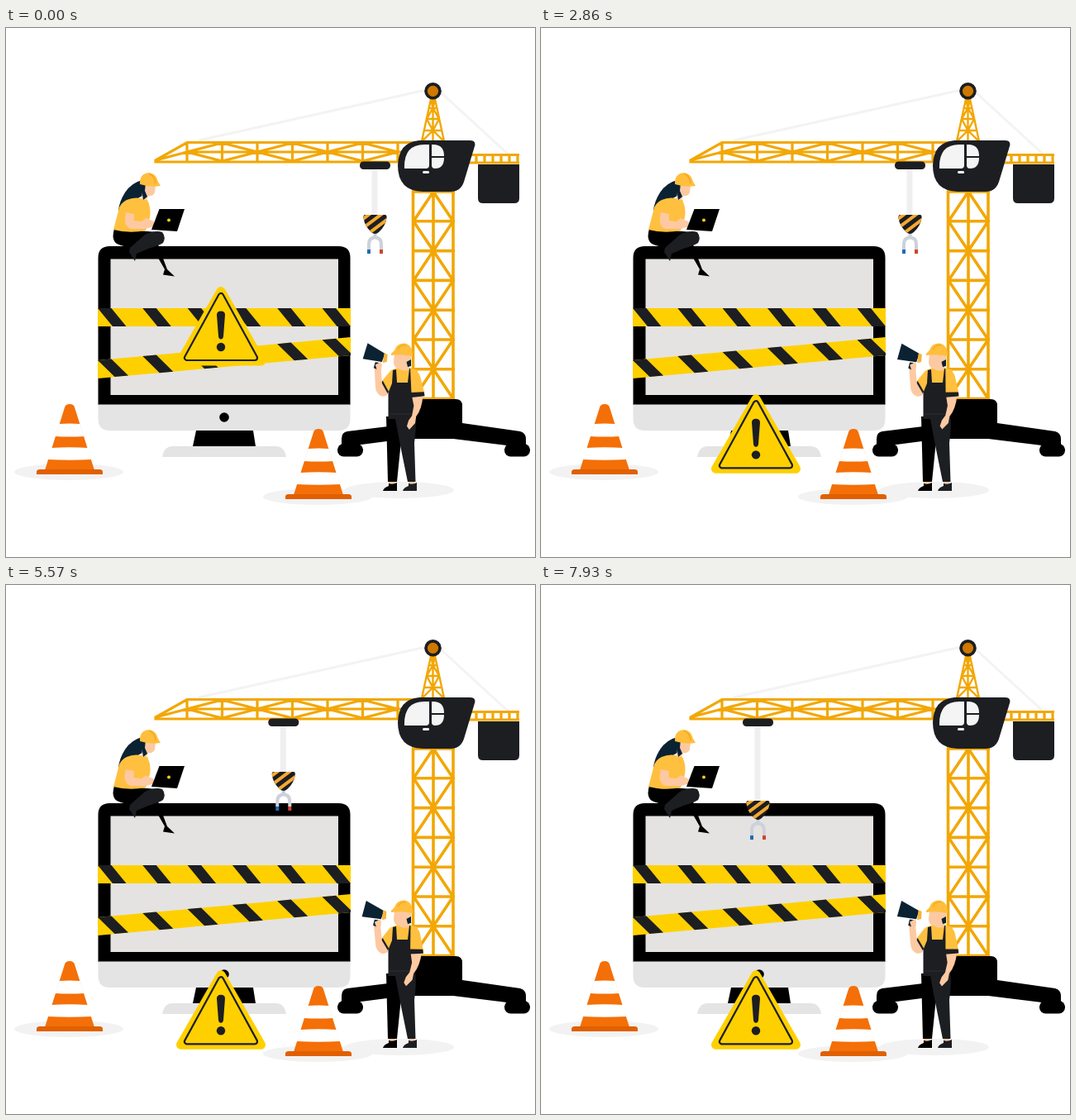
Recreate the animation shown at these times as an HTML page. Size 640 px wide and 640 px high, loop 8 s.

```html
<!DOCTYPE html>
<html lang="en">
<head>
<meta charset="utf-8">
<title>Under construction</title>
<style>
  html, body { margin: 0; width: 100%; height: 100%; overflow: hidden; background: #fff; }
  svg { display: block; width: 100vw; height: 100vh; }
  .ink { fill: #1c1e22; }
  .skin { fill: #fdc9a2; }
  .shirt { fill: #ffc03f; }
  .navy { fill: #0b2233; }
  .tape { fill: #ffd000; }
  .truss { fill: none; stroke: #f2a705; stroke-width: 3.2; }
  #tower { stroke-width: 3.6; }
  #peak { stroke-width: 2.4; }
</style>
</head>
<body>
<svg viewBox="0 0 640 640">
  <defs>
    <g id="cone">
      <ellipse cx="76" cy="537" rx="66" ry="10" fill="#f2f2f2"/>
      <path d="M71 459Q72 455 77 455Q82 455 83 459L107 535H47Z" fill="#f46f07"/>
      <path d="M64.500 479Q77 478 89.500 479L94.500 494Q77 495 59.500 494ZM55 508Q77 506.500 99 508L103.500 522Q77 523.500 50.500 522Z" fill="#fff"/>
      <path d="M37 540V537Q37 534 41 534H113Q117 534 117 537V540Z" fill="#e06000"/>
    </g>
    <clipPath id="block"><path d="M434 226H459Q461 226 460.500 230Q459 240 451 247Q446.500 251 442 247Q434 240 432.500 230Q432 226 434 226Z"/></clipPath>
    <clipPath id="screenWidth"><path d="M111 330H417V430H111Z"/></clipPath>
  </defs>

  <!-- Crane -->
  <path d="M233 136L508 75M525 77L610 155" fill="none" stroke="#f3f3f3" stroke-width="3"/>
  <path id="jib" class="truss"/>
  <path id="tower" class="truss"/>
  <path id="peak" class="truss"/>
  <path id="counterJib" class="truss"/>
  <circle cx="516.500" cy="76.300" r="10.300" class="ink"/>
  <circle cx="516.500" cy="76.300" r="6.600" fill="#cf7800"/>
  <path class="ink" d="M571 165H621V206Q621 212 615 212H577Q571 212 571 206Z"/>
  <path class="ink" d="M500 136H561Q569 136 567 143L554 186Q550 198 538 198H504Q474 197 474 166Q475 138 500 136Z"/>
  <path fill="#f4f4f4" d="M482 170Q481 141 506 141H512V166Q512 170 508 170ZM515 141H517Q530 141 530 155H515ZM515 157H530Q530 170 519 170Q515 170 515 166ZM505 173H511Q512 173 512 174.500T511 176H505Q504 175.500 504 174.500T505 173Z"/>
  <path d="M479 480V457Q479 449 487 449H544Q552 449 552 457V478L622 488Q629 490 629 497V505H606L541 497H484L422 505H406V497Q406 489 413 488Z"/>
  <rect x="401" y="503" width="31" height="15.500" rx="7.500"/>
  <rect x="603" y="503" width="31" height="15.500" rx="7.500"/>

  <!-- Monitor -->
  <path d="M230 487H299L302 506H226Z"/>
  <path d="M189 519Q191 506 202 506H326Q337 506 339 519Z" fill="#e4e4e4"/>
  <path d="M111.500 456V278Q111.500 264 125.500 264H402.500Q416.500 264 416.500 278V456Z"/>
  <path d="M111.500 455.500H416.500V473Q416.500 487 402.500 487H125.500Q111.500 487 111.500 473Z" fill="#e4e4e4"/>
  <rect x="126.500" y="279.500" width="275.500" height="164.500" fill="#e4e3e2"/>
  <circle cx="264" cy="471" r="5.800"/>
  <g clip-path="url(#screenWidth)">
    <path class="tape" d="M111 339H417V361H111Z"/>
    <path id="upperStripes" class="ink"/>
    <path class="tape" d="M111 402L417 374V396L111 424Z"/>
    <path id="lowerStripes" class="ink"/>
  </g>

  <!-- Seated worker -->
  <path class="navy" d="M165 184Q152 187 144 199Q137 210 136 221Q147 213 154 207Q167 206 171 194Z"/>
  <path d="M184 262L189 276L195 292L204 300.500L190 298.500L192 292L184 278L178 262Z"/>
  <path d="M131 243Q127 256 134 261Q146 267 164 264L181 261L184 247Z"/>
  <path class="ink" d="M150 266L168 250Q181 244 189 247Q194 253 190 260Q186 263 172 267L158 273L156 282L149 271Z"/>
  <path class="shirt" d="M146 208Q157 203 171 208Q176 218 174 229L169 245Q149 249 130 244Q133 233 137 217Q140 211 146 208Z"/>
  <path class="skin" d="M166 188L181 190L180 199Q178 204 172 203L170 208H164Z"/>
  <path class="navy" d="M163 187H169L168 197L171 204L166 208Z"/>
  <path fill="#ffbe3c" d="M162 189Q161 178 170 175.500Q181 174 184 186L187 191Q175 193 162 189Z"/>
  <path d="M173 176Q180 179 181 188" fill="none" stroke="#f2a91f" stroke-width="1.500"/>
  <g id="typingArm">
    <path class="shirt" d="M145 211Q152 210 157 219L156 226L143 224Z"/>
    <path class="skin" d="M145 223L155 225L155 233L164 234L169 230L179 234V240L169 243L151 243Q143 240 144 230Z"/>
  </g>
  <path d="M185.500 219H216L207 246L176 244Z"/>
  <circle cx="197" cy="232.500" r="2" fill="#f5cf16"/>

  <!-- Trolley and hook -->
  <g id="trolley">
    <rect x="428" y="161.500" width="37" height="9.500" rx="4.500" class="ink"/>
    <rect id="rope" x="442.500" y="171" width="7" fill="#efefef"/>
    <g id="hook">
      <path d="M446.500 248V255" stroke="#c9ced6" stroke-width="4"/>
      <path d="M439 268V262Q439 253.500 446.500 253.500T454 262V268" fill="none" stroke="#cdd1da" stroke-width="4"/>
      <path d="M437 268H441V273H437Z" fill="#2369b4"/>
      <path d="M452 268H456V273H452Z" fill="#d0432c"/>
      <g clip-path="url(#block)">
        <path class="ink" d="M430 224H464V252H430Z"/>
        <path d="M428 234L444 222M428 245L460 221M432 253.500L468 226.500" stroke="#f5a92f" stroke-width="4"/>
      </g>
    </g>
  </g>

  <!-- Standing worker -->
  <ellipse cx="476" cy="559" rx="66" ry="10" fill="#f2f2f2"/>
  <use href="#cone"/>
  <use href="#cone" x="301" y="30"/>
  <path class="skin" d="M463 546H471V553H463ZM487 546H494V553H487Z"/>
  <path d="M460 470H481L473 549H462Z"/>
  <path class="ink" d="M470 468H495Q497 480 494 502L495.500 549H486L477 505Z"/>
  <path d="M463 551Q468 553 473 550V560H456Q457 556 463 554Z"/>
  <path class="ink" d="M487 551Q492 553 497 550V560H480Q481 556 487 554Z"/>
  <path class="shirt" d="M466 414L474 411H488L498 414V445H466Z"/>
  <g id="megaphoneArm">
    <path class="shirt" d="M466 414L454 428L460 442L470 433Z"/>
    <path class="ink" d="M453 429L456 427L463 440L460 444Z"/>
    <path class="skin" d="M446 413Q445 406 449 404L455 407L454 415L455 430L462 443Q459 447 453 445Q447 441 447 434Z"/>
    <path class="navy" d="M438 381L459 394L455 404L432 400Z"/>
    <path d="M458 393L462 395L461 404L456 405Z" fill="#f4b33c"/>
    <path d="M447 404L452 405L449 413L445 411Z" class="navy"/>
    <path class="skin" d="M447 407L454 404L455 409L449 414Z"/>
  </g>
  <path class="ink" d="M468 414L472 413L473 429H486L488 412L492 413L494 430L495 473H462.500V441L467 430Z"/>
  <path d="M463 467H494" stroke="#34363a" stroke-width=".7"/>
  <path class="skin" d="M470 394H490V404L487 414Q480 416 475 412Q469 411 469 404Z"/>
  <path class="navy" d="M484.500 404L490 401V409L486 410Z"/>
  <path fill="#ffbe3c" d="M466 394L470 390Q472 382 481 381.500Q492 382 492 397Q479 394 466 396Z"/>
  <path d="M474 389Q478 382 484 384" fill="none" stroke="#f2a91f" stroke-width="1.300"/>
  <g id="loweredArm">
    <path class="skin" d="M491 443H505Q504 461 497 470L496 478L489 486L486 482L488 475L492 469L494 457Z"/>
    <path class="shirt" d="M489 412Q498 413 501 421L507 443L491 444Z"/>
    <path class="ink" d="M490 441L506 440L507 445L491 447Z"/>
  </g>

  <!-- Warning sign -->
  <g id="sign" stroke-linejoin="round">
    <path d="M260 335.500L211.500 420H308.500Z" fill="#ffd000" stroke="#ffd000" stroke-width="11"/>
    <path d="M260 341L219 416H301Z" fill="#1c1e22" stroke="#1c1e22" stroke-width="8.200"/>
    <path d="M260 341L219 416H301Z" fill="#ffd000" stroke="#ffd000" stroke-width="3.800"/>
    <path class="ink" d="M255 364Q255 359.500 260 359.500T265 364L263 390Q262.500 393.500 260 393.500T257 390Z"/>
    <circle cx="260" cy="403" r="5.200" class="ink"/>
  </g>
</svg>
<script>
const LOOP = 8000;
const el = id => document.getElementById(id);
const line = (...p) => 'M' + p.join(' ');
const range = (n, f) => Array.from({ length: n }, (_, i) => f(i)).join('');

function drawTrusses() {
  el('jib').setAttribute('d',
    'M500 138.500H219L181 160V162H500M181 160L219 150H490' +
    range(7, i => line(219 + 42.5 * i, 138, 219 + 42.5 * i, 162)) +
    range(6, i => {
      const x = 219 + 42.5 * i, [tip, wide] = i % 2 ? [x + 42.5, x] : [x, x + 42.5];
      return line(wide, 139, tip, 150, wide, 161);
    }));

  el('tower').setAttribute('d',
    'M492.500 197V449M541 197V449M517 197V449' +
    range(8, i => line(491, 198 + 35.8 * i, 543, 198 + 35.8 * i)) +
    range(7, i => {
      const y = 198 + 35.8 * i, [tip, wide] = i % 2 ? [y + 35.8, y] : [y, y + 35.8];
      return line(493, wide, 517, tip, 541, wide);
    }));

  const levels = [86, 97, 110, 124, 137];
  const half = y => 2.5 + (y - 86) * 0.21;
  el('peak').setAttribute('d',
    'M503 137L514 86M530 137L519 86M516.500 86V137' +
    levels.slice(1).map((y, i) => {
      const c = 516.5, [tip, wide] = i % 2 ? [levels[i], y] : [y, levels[i]];
      return line(c - half(y), y, c + half(y), y) +
        line(c - half(wide), wide, c, tip, c + half(wide), wide);
    }).join(''));

  el('counterJib').setAttribute('d',
    'M560 153.500H621M560 163H621' + range(6, i => line(569 + 10 * i, 153, 569 + 10 * i, 164)));
}

function drawStripes(id, top, slope, lean) {
  const at = (x, dy) => [x, top + dy + slope * (x - 111)];
  el(id).setAttribute('d', range(6, i => {
    const x = 111 + 54.3 * i;
    return line(...at(x, 0), ...at(x + 16.5, 0), ...at(x + lean + 16.5, 22), ...at(x + lean, 22)) + 'Z';
  }));
}

const progress = (t, start, end) => Math.min(1, Math.max(0, (t - start) / (end - start)));
const easeInOut = (u, power) =>
  u < 0.5 ? (2 * u) ** power / 2 : 1 - (2 - 2 * u) ** power / 2;
const move = (id, x, y) => el(id).setAttribute('transform', `translate(${x} ${y})`);
const turn = (id, angle, x, y) => el(id).setAttribute('transform', `rotate(${angle} ${x} ${y})`);

function render(t) {
  move('sign', 0, -17 + 153.3 * easeInOut(progress(t, 1409, 3591), 3));
  move('trolley', -184 * easeInOut(progress(t, 4209, 6644), 1.8), 0);

  const drop = 35 * (Math.max(0, t - 7000) / 930) ** 2;
  move('hook', 0, drop);
  el('rope').setAttribute('height', 55 + drop);

  const sway = (1 - Math.cos(2 * Math.PI * (t / 2500 - 0.86))) / 2;
  turn('megaphoneArm', -3 * sway, 462, 432);
  turn('loweredArm', 5 * sway, 496, 418);
  turn('typingArm', 2 * sway - 0.5, 150, 214);
}

drawTrusses();
drawStripes('upperStripes', 339, 0, 18);
drawStripes('lowerStripes', 402, -28 / 306, 20.5);

function tick(now) {
  render(now % LOOP);
  requestAnimationFrame(tick);
}
render(0);
requestAnimationFrame(tick);
</script>
</body>
</html>
```
